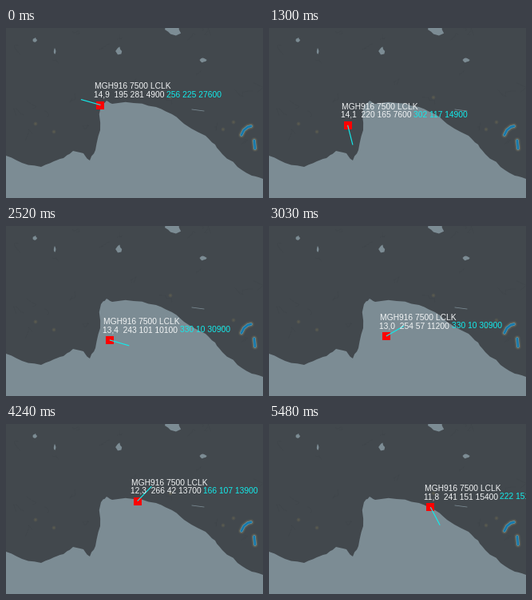
Write a matplotlib script that moves like this. It is 322 px wide and 213 px high and loops after 5.51 s.

```python
import numpy as np
import matplotlib.pyplot as plt
from matplotlib.animation import FuncAnimation
from matplotlib.patches import Ellipse, Polygon, Rectangle

W, H, DPI = 322, 213, 64
FRAMES, STEP = 190, 29
LAND, SEA, CYAN, WHITE = "#42484d", "#7c8c94", "#12ecec", "#f2f4f5"
SIDE, VECTOR, PX_PER_KNOT = 10, 25.5, 0.142

# seconds, x, y, heading
WAYPOINTS = np.array([
    (0.00, 118.5, 96.5, 281),
    (0.67, 102.2, 102.2, 223),
    (1.30, 98.8, 122.5, 163),
    (2.52, 130.7, 143.0, 100),
    (3.55, 157.0, 121.0, 10),
    (4.24, 164.8, 96.4, 42),
    (5.48, 202.3, 104.2, 151),
])
TIMES = WAYPOINTS[:, 0]

# end time, selected values
SELECTED = [
    (0.34, "256 225 27600"),
    (1.90, "302 117 14900"),
    (4.08, "330 10 30900"),
    (4.86, "166 107 13900"),
    (9.00, "222 151 13900"),
]

COAST = np.array([
    (0, 160), (20, 169), (44, 174), (60, 167), (72, 163), (84, 154),
    (97, 157), (105, 166), (112, 153), (118, 128), (119, 98), (126, 91),
    (133, 95), (160, 94), (188, 99), (208, 108), (223, 120), (250, 135),
    (262, 146), (271, 158), (290, 174), (308, 185), (322, 189),
])
LAKES = [(209, 2, 24, 15), (36, 15, 6, 6), (61, 29, 3, 8),
         (141, 29, 8, 11), (247, 40, 9, 7)]
PONDS = [[(295, 134), (298, 128), (303, 124), (307, 123)],
         [(311, 141), (312, 151)]]
GLOWS = [(37, 120), (60, 130), (272, 127), (285, 118), (206, 87)]


def direction(deg):
    a = np.radians(deg)
    return np.array([np.sin(a), -np.cos(a)])


def ground_speed(t):
    """Accelerates, then slows down again in the last turn."""
    return min(195 + 19.4 * t, 266 - 20.2 * (t - 4.24))


def climb_time(t):
    """Seconds of full climb; the climb eases off at the end."""
    return min(t, 4.24) + 0.615 * max(t - 4.24, 0)


def position(t):
    """Cubic Hermite path whose tangents follow heading and speed."""
    k = int(np.clip(np.searchsorted(TIMES, t, "right") - 1, 0, len(TIMES) - 2))
    a, b = WAYPOINTS[k:k + 2]
    dt = b[0] - a[0]
    u = (t - a[0]) / dt
    va, vb = (direction(p[3]) * ground_speed(p[0]) * PX_PER_KNOT * dt
              for p in (a, b))
    return ((2 * u**3 - 3 * u**2 + 1) * a[1:3] + (u**3 - 2 * u**2 + u) * va
            + (3 * u**2 - 2 * u**3) * b[1:3] + (u**3 - u**2) * vb)


def rough(points, rng, parts=3, amount=0.6):
    """Subdivide a line and shake the new points a little."""
    n = len(points)
    s = np.linspace(0, n - 1, (n - 1) * parts + 1)
    line = np.column_stack([np.interp(s, range(n), points[:, c])
                            for c in (0, 1)])
    shake = rng.normal(0, amount, line.shape)
    shake[::parts] = 0
    return line + shake


def blob(x, y, w, h, rng, n=10):
    a = np.linspace(0, 2 * np.pi, n, endpoint=False)
    r = rng.uniform(0.3, 0.55, n)
    return np.column_stack([x + w * r * np.cos(a), y + h * r * np.sin(a)])


def draw_map(ax):
    rng = np.random.default_rng(4)
    for _ in range(26):
        x, y = rng.uniform((0, 0), (W, 150))
        steps = rng.normal(0, 3.5, (5, 2)).cumsum(axis=0)
        ax.plot(x + steps[:, 0], y + steps[:, 1], color="#363c41",
                lw=0.6, alpha=0.25, zorder=0)
    for x, y in GLOWS:
        for size in (5, 3, 1.5):
            ax.add_patch(Ellipse((x, y), size, size, color="#8a8258",
                                 alpha=0.15, lw=0))
    sea = np.vstack([rough(COAST, rng), [(W, H), (0, H)]])
    for shape in [sea] + [blob(*lake, rng) for lake in LAKES]:
        ax.add_patch(Polygon(shape, color=SEA, lw=0))
    ax.plot([233, 248], [102, 104], color=SEA, lw=0.9)
    strokes = [("#938c68", 9, 0.15), ("#938c68", 6.5, 0.25),
               ("#6fb0c4", 4, 0.8), ("#1478ac", 2.8, 1)]
    for pond in PONDS:
        for color, width, alpha in strokes:
            ax.plot(*zip(*pond), color=color, lw=width, alpha=alpha,
                    solid_capstyle="round", solid_joinstyle="round")


fig = plt.figure(figsize=(W / DPI, H / DPI), dpi=DPI, facecolor=LAND)
ax = fig.add_axes([0, 0, 1, 1])
ax.set_xlim(0, W)
ax.set_ylim(H, 0)
ax.axis("off")
draw_map(ax)

plane = ax.add_patch(Rectangle((0, 0), SIDE, SIDE, color="#ff0000", lw=0,
                               zorder=5))
vector, = ax.plot([], [], color=CYAN, lw=1.3, zorder=6,
                  solid_capstyle="butt")


def label(text, color):
    return ax.text(0, 0, text, color=color, family="Liberation Sans",
                   size=10.2 * 72 / DPI, va="baseline", zorder=7)


callsign = label("MGH916 7500 LCLK", WHITE)
state = label("", WHITE)
selected = label("", CYAN)


def update(i):
    t = i * STEP / 1000
    x, y = position(t)
    heading = np.interp(t, TIMES, WAYPOINTS[:, 3])
    track = heading + 5 * np.sin(np.radians(heading)) ** 2
    climb = climb_time(t)
    distance = f"{14.9 - 0.62 * climb:.1f}".replace(".", ",")
    altitude = round(49 + 20.9 * climb) * 100

    plane.set_xy((x - SIDE / 2, y - SIDE / 2))
    dx, dy = direction(track) * VECTOR
    vector.set_data([x, x + dx], [y, y + dy])

    callsign.set_position((x - 7.5, y - 20))
    state.set_text(f"{distance}  {ground_speed(t):.0f} {heading:.0f} "
                   f"{altitude}")
    state.set_position((x - 8.5, y - 9.8))
    right = state.get_window_extent().x1 * W / fig.bbox.width
    selected.set_text(next(s for end, s in SELECTED if t < end))
    selected.set_position((right + 2.5, y - 9.8))
    return plane, vector, callsign, state, selected


anim = FuncAnimation(fig, update, frames=FRAMES, interval=STEP, repeat=True,
                     repeat_delay=0, blit=False)
plt.show()
```
